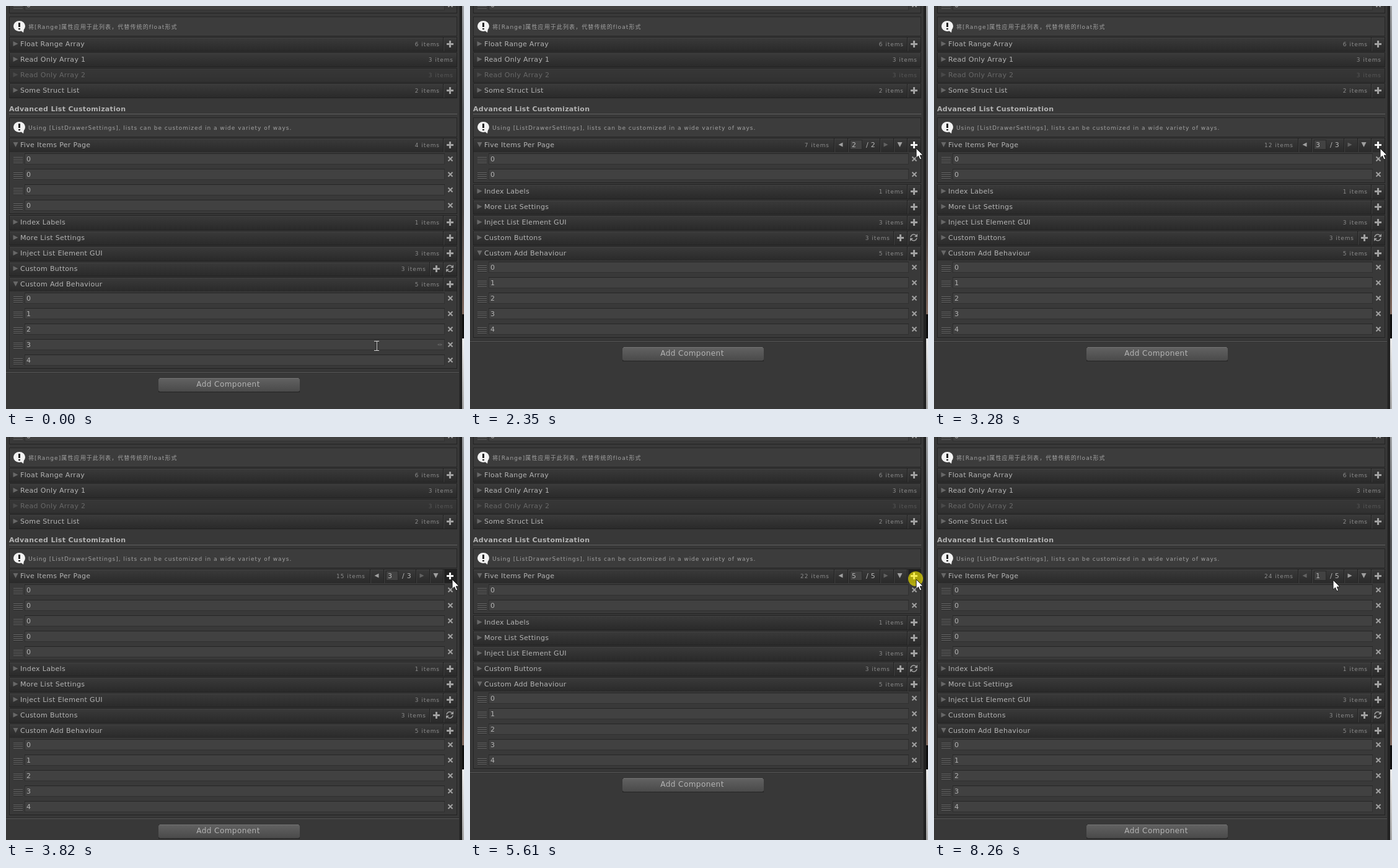
Write an HTML page with a canvas that moves like this. It is 739 px wide and 651 px high and loops after 8.87 s.

```html
<!DOCTYPE html>
<html lang="en">
<head>
<meta charset="utf-8">
<title>List customization</title>
<style>
html, body { margin: 0; width: 100%; height: 100%; overflow: hidden; background: #383838; }
canvas { display: block; }
</style>
</head>
<body>
<canvas id="stage" width="739" height="651"></canvas>
<script>
const ctx = document.getElementById('stage').getContext('2d');
const LOOP = 8870, PER_PAGE = 5, LINE = 25;
const SANS = '"DejaVu Sans", "Noto Sans CJK SC", "Noto Sans CJK", sans-serif';

// [pressed, released] times; every press adds an item
const ADD_CLICKS = [
  [1420, 1510], [2110, 2190], [2270, 2350], [2430, 2580], [2660, 2740],
  [2810, 2890], [2980, 3060], [3140, 3210], [3290, 3370], [3440, 3520],
  [3670, 3750], [3900, 4050], [4140, 4280], [4370, 4600], [4680, 4830],
  [4910, 4990], [5060, 5140], [5610, 5690], [5770, 5850], [5930, 6010]
];
const BACK_CLICKS = [[6540, 6620], [7080, 7160], [7620, 7700], [7780, 7860]];
// The click ring shows before the button reacts
const RING_ONLY = [[1280, 1420], [2030, 2110], [3600, 3670], [6460, 6540], [7000, 7080], [7540, 7620]];
const HELD = [[3820, 3900]];
const HOVER_ADD = [560, 6090];
const CURSOR = [
  [0, 598, 549], [100, 640, 470], [180, 690, 370], [260, 715, 290],
  [340, 727, 240], [420, 725, 217], [730, 722, 224], [800, 720, 230],
  [6090, 700, 231], [6170, 660, 231], [6240, 625, 231], [6380, 602, 226],
  [8090, 612, 223], [8170, 630, 228], [8260, 644, 231]
];

const within = (t, [a, b]) => t >= a && t < b;
const during = (t, spans) => spans.some(s => within(t, s));
const started = (t, spans) => spans.filter(s => t >= s[0]).length;

function rect(x, y, w, h, fill) {
  ctx.fillStyle = fill;
  ctx.fillRect(x, y, w, h);
}

function frame(x, y, w, h, color) {
  ctx.strokeStyle = color;
  ctx.lineWidth = 1;
  ctx.strokeRect(x + .5, y + .5, w - 1, h - 1);
}

function shade(y, h, ...colors) {
  const g = ctx.createLinearGradient(0, y, 0, y + h);
  colors.forEach((c, i) => g.addColorStop(i / (colors.length - 1), c));
  return g;
}

function text(str, x, y, { size = 11, color = '#b4b4b4', gap = .32, align = 'left', weight = '' } = {}) {
  ctx.font = `${weight} ${size}px ${SANS}`;
  ctx.letterSpacing = gap + 'px';
  ctx.textAlign = align;
  ctx.fillStyle = color;
  ctx.fillText(str, x, y);
}

const small = (str, x, y, align = 'left', color = '#8c8c8c') =>
  text(str, x, y, { size: 9, gap: .95, align, color });

function poly(points, fill) {
  ctx.beginPath();
  points.forEach(([x, y]) => ctx.lineTo(x, y));
  ctx.closePath();
  ctx.fillStyle = fill;
  ctx.fill();
}

function triangle(x, y, dir, color, r = 4) {
  const shapes = {
    right: [[-r, -r], [r, 0], [-r, r]],
    left: [[r, -r], [-r, 0], [r, r]],
    down: [[-r, -r], [r, -r], [0, r]]
  };
  poly(shapes[dir].map(([dx, dy]) => [x + dx, y + dy]), color);
}

function plus(x, y, color = '#a2a2a2') {
  rect(x - 6, y - 1, 11, 3, color);
  rect(x - 2, y - 5, 3, 11, color);
}

function cross(x, y) {
  ctx.strokeStyle = '#a0a0a0';
  ctx.lineWidth = 2;
  ctx.beginPath();
  ctx.moveTo(x - 3.5, y - 3.5); ctx.lineTo(x + 3.5, y + 3.5);
  ctx.moveTo(x + 3.5, y - 3.5); ctx.lineTo(x - 3.5, y + 3.5);
  ctx.stroke();
}

function refresh(x, y) {
  ctx.strokeStyle = '#a0a0a0';
  ctx.lineWidth = 1.5;
  for (const a of [Math.PI, 0]) {
    ctx.beginPath();
    ctx.arc(x, y, 5, a + .1, a + 2.5);
    ctx.stroke();
  }
  poly([[x + 6, y - 6], [x + 6, y - 1], [x + 1, y - 1]], '#a0a0a0');
  poly([[x - 6, y + 6], [x - 6, y + 1], [x - 1, y + 1]], '#a0a0a0');
}

function divider(x, y) {
  rect(x, y - 10, 1, 22, '#222222');
  rect(x + 1, y - 10, 1, 22, '#404040');
}

function header(label, y, { items, open, buttons = ['plus'], hover, held, pager } = {}) {
  rect(5, y - 11, 723, 24, '#212121');
  rect(6, y - 10, 721, 22, shade(y - 10, 22, '#3a3a3a', '#2a2a2a'));
  rect(6, y - 10, 721, 1, '#434343');
  triangle(15.5, y, open ? 'down' : 'right', '#686868');
  text(label, 23, y + 4);
  if (held) rect(706, y - 10, 21, 22, '#212121');
  buttons.forEach((kind, i) => {
    const x = 716 - 22 * (buttons.length - 1 - i);
    divider(x - 11, y);
    if (kind === 'plus') plus(x + (x > 700 ? 1 : 1), y, hover ? '#f4f4f4' : undefined);
    else refresh(x, y);
  });
  let right = 722 - 22 * buttons.length;
  if (pager) {
    const { page, pages, pressed } = pager;
    if (pressed) rect(588, y - 10, 21, 22, '#212121');
    [587, 609, 661, 683].forEach(x => divider(x, y));
    const arrow = on => on ? '#a0a0a0' : '#626262';
    triangle(598, y, 'left', arrow(page > 1), 3.5);
    triangle(671, y, 'right', arrow(page < pages), 3.5);
    triangle(693.5, y, 'down', '#a0a0a0', 4);
    rect(613, y - 8, 20, 16, '#424242');
    frame(613, y - 8, 20, 16, '#292929');
    text(page, 616, y + 4);
    text('/ ' + pages, 639, y + 4);
    right = 580;
  }
  if (items !== undefined) small(items + ' items', right, y + 4, 'right');
}

function row(value, y, scrub) {
  rect(5, y - 11, 723, LINE, '#242424');
  rect(6, y - 11, 721, LINE, '#393939');
  for (let i = 0; i < 4; i++) {
    rect(12, y - 3 + i * 3, 15, 1, '#686868');
    rect(12, y - 2 + i * 3, 15, 1, '#2b2b2b');
  }
  rect(30, y - 9, 678, 18, '#414141');
  frame(30, y - 9, 678, 18, '#303030');
  rect(30, y - 9, 678, 1, '#262626');
  text(value, 33, y + 4);
  if (scrub) {
    triangle(697.5, y, 'left', '#5e5e5e', 2);
    triangle(702.5, y, 'right', '#5e5e5e', 2);
  }
  cross(717, y);
}

function rows(values, y, scrubIndex = -1) {
  values.forEach((v, i) => row(v, y + i * LINE, i === scrubIndex));
  const end = y + values.length * LINE;
  rect(5, end - 12, 723, 1, '#222222');
  return end;
}

function info(str, y, gap) {
  rect(5, y - 16, 723, 32, '#3c3c3c');
  frame(5, y - 16, 723, 32, '#262626');
  ctx.fillStyle = '#f2f2f2';
  ctx.beginPath();
  ctx.ellipse(21.5, y - .5, 9.5, 8.5, 0, 0, 7);
  ctx.fill();
  poly([[23, y + 6], [29, y + 4], [28, y + 10]], '#f2f2f2');
  rect(20, y - 6, 3, 7, '#222222');
  rect(20, y + 3, 3, 2, '#222222');
  text(str, 36, y + 4, { size: 9, gap, color: '#a2a2a2' });
}

function addButton(y) {
  rect(246, y - 10, 228, 23, '#242424');
  ctx.beginPath();
  ctx.roundRect(246, y - 10, 228, 22, 3);
  ctx.fillStyle = shade(y - 10, 22, '#626262', '#4a4a4a');
  ctx.fill();
  rect(248, y - 10, 224, 1, '#747474');
  text('Add Component', 358.5, y + 4, { size: 12, gap: .45, align: 'center' });
}

function rightEdge() {
  rect(731, 0, 1, 651, '#303030');
  rect(732, 0, 4, 651, '#222222');
  rect(736, 0, 3, 498, shade(0, 498, '#a0a3a6', '#55575a', '#4a4645', '#806a60'));
  rect(736, 498, 3, 39, '#101010');
  rect(736, 537, 3, 114, shade(537, 114, '#eeeeee', '#a6a6a6'));
}

function ibeam(x, y) {
  rect(x - 1, y - 7, 3, 15, '#222222');
  rect(x - 4, y - 8, 8, 1, '#d8d8d8');
  rect(x - 4, y + 7, 8, 1, '#d8d8d8');
  rect(x, y - 7, 1, 14, '#e4e4e4');
}

function arrowCursor(x, y) {
  const shape = [[0, 0], [0, 15.5], [3.5, 12.2], [6, 18], [8.6, 16.8], [6.2, 11.2], [11, 11]];
  poly(shape.map(([dx, dy]) => [x + dx, y + dy]), '#ffffff');
  ctx.strokeStyle = '#161616';
  ctx.lineWidth = 1;
  ctx.stroke();
}

function ring(x, y) {
  ctx.fillStyle = 'rgba(245, 232, 0, .66)';
  ctx.beginPath();
  ctx.arc(x - 1, y - 1, 12, 0, 7);
  ctx.fill();
}

function staticPart() {
  rect(0, 0, 739, 651, '#383838');
  rows(['0'], -2);
  info('将[Range]属性应用于此列表，代替传统的float形式', 33, 1.1);
  header('Float Range Array', 61, { items: 6 });
  header('Read Only Array 1', 86, { items: 3, buttons: [] });
  header('Read Only Array 2', 111, { items: 3, buttons: [] });
  rect(6, 101, 721, 22, 'rgba(54, 54, 54, .6)');
  header('Some Struct List', 136, { items: 2 });
  text('Advanced List Customization', 5, 170, { weight: 'bold' });
  rect(5, 174, 723, 1, '#606060');
  info('Using [ListDrawerSettings], lists can be customized in a wide variety of ways.', 196, .97);
}

function draw(t) {
  const count = 4 + started(t, ADD_CLICKS);
  const pages = Math.ceil(count / PER_PAGE);
  const page = pages - started(t, BACK_CLICKS);
  const shown = Math.min(PER_PAGE, count - (page - 1) * PER_PAGE);
  const adding = during(t, ADD_CLICKS), paging = during(t, BACK_CLICKS);
  const [, cx, cy] = CURSOR.filter(k => k[0] <= t).pop();
  const overField = t < CURSOR[1][0];

  staticPart();
  header('Five Items Per Page', 224, {
    items: count, open: true,
    hover: within(t, HOVER_ADD),
    held: adding || during(t, HELD),
    pager: pages > 1 && { page, pages, pressed: paging }
  });
  let y = rows(Array(shown).fill('0'), 247) + 2;
  const next = (label, options) => { header(label, y, options); y += LINE; };
  next('Index Labels', { items: 1 });
  next('More List Settings');
  next('Inject List Element GUI', { items: 3 });
  next('Custom Buttons', { items: 3, buttons: ['plus', 'refresh'] });
  next('Custom Add Behaviour', { items: 5, open: true });
  y = rows(['0', '1', '2', '3', '4'], y - 2, overField ? 3 : -1);
  rect(0, y - 7, 732, 1, '#282828');
  rect(0, y - 6, 732, 1, '#5a5a5a');
  addButton(y + 14);
  rightEdge();

  if (adding || paging || during(t, RING_ONLY)) ring(cx, cy);
  if (overField) ibeam(cx, cy);
  else arrowCursor(cx, cy);
}

const begin = performance.now();
function tick() {
  draw((performance.now() - begin) % LOOP);
  requestAnimationFrame(tick);
}
tick();
</script>
</body>
</html>
```
